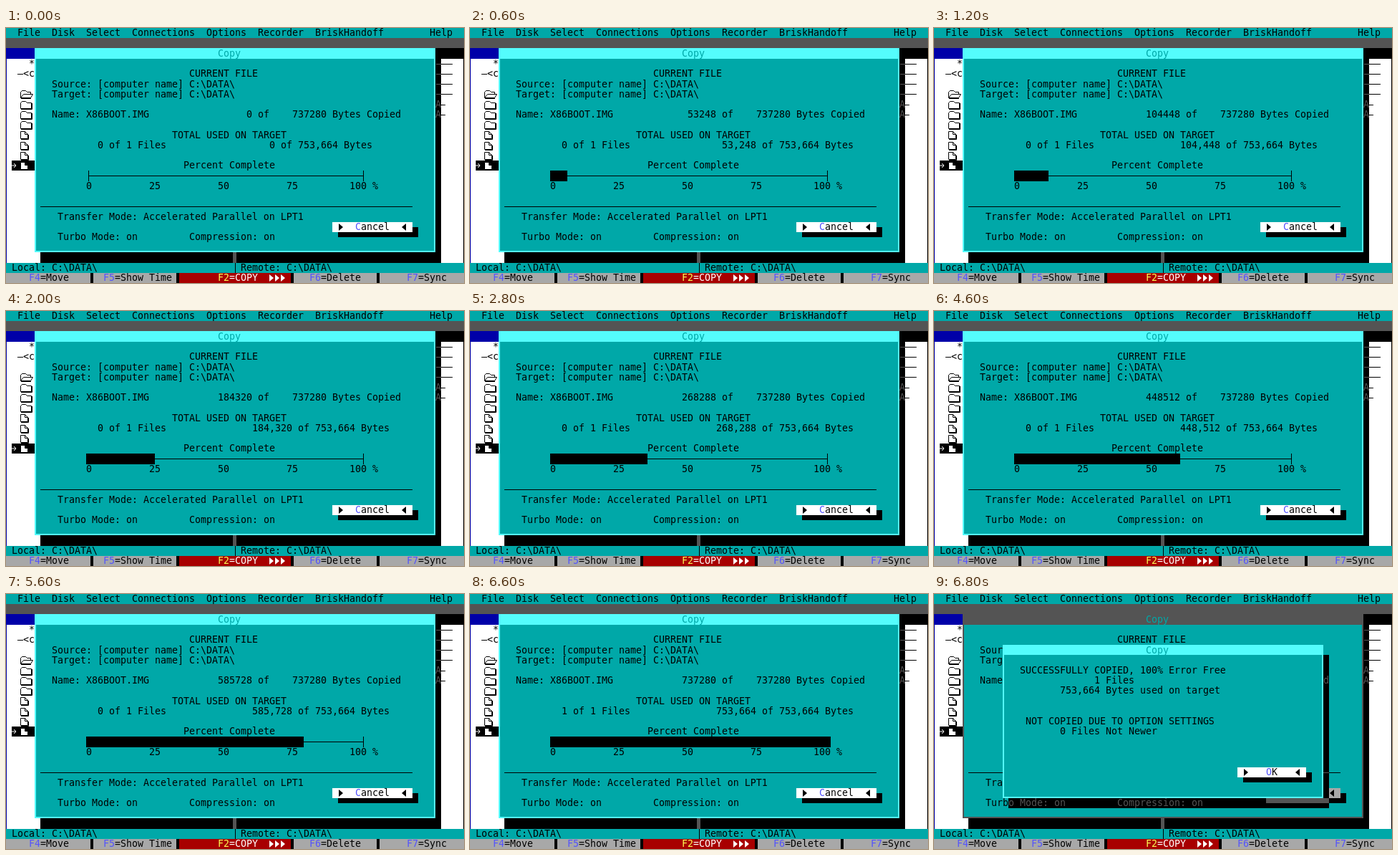
An HTML page that plays this animation: 640 by 356 pixels, repeating every 7000 ms.

```html
<!DOCTYPE html>
<html lang="en">
<head>
<meta charset="utf-8">
<title>Copy</title>
<style>
html, body { margin: 0; width: 100%; height: 100%; overflow: hidden; background: #000; }
svg { display: block; width: 640px; height: 356px; }
text { font: 13.29px "DejaVu Sans Mono", monospace; white-space: pre; }
rect, line { shape-rendering: crispEdges; }
</style>
</head>
<body>
<svg id="screen" viewBox="0 0 640 356"></svg>
<script>
(() => {
const LOOP = 7000, STEP = 200, CELL = 8, ROW = 14.24;
const INK = '#000', WHITE = '#fff', TEAL = '#00a8a8', CYAN = '#54fcfc', DARK = '#545454',
      GRAY = '#a8a8a8', NAVY = '#0000a8', HOT = '#5454fc', RED = '#a80000', YELLOW = '#fcfc54';

const rowTop = row => Math.round(row * ROW);
const rowMid = row => Math.round(row * ROW + 7);

const box = (x1, y1, x2, y2, fill, extra = '') =>
  `<rect x="${x1}" y="${y1}" width="${x2 - x1}" height="${y2 - y1}" fill="${fill}" ${extra}/>`;
const cells = (x1, r1, x2, r2, fill, extra) => box(x1, rowTop(r1), x2, rowTop(r2), fill, extra);
const text = (x, row, str, fill = INK, extra = '') =>
  `<text x="${x}" y="${Math.round(row * ROW + 11.3)}" fill="${fill}" ${extra}>${str.replace(/</g, '&lt;')}</text>`;
const rule = (x1, x2, y, fill = INK) => box(x1, y, x2, y + 1, fill);

// Solid triangle in one cell; dir is 1 for right, -1 for left.
function arrow(x, row, dir, fill = INK) {
  const a = dir > 0 ? x + 1 : x + 7, y = rowMid(row);
  return `<path d="M${a} ${y - 5}L${a + 6 * dir} ${y}L${a} ${y + 5}Z" fill="${fill}"/>`;
}

function button(x1, x2, row, label, labelX) {
  const y = rowTop(row);
  return box(x1 + 8, y + 7, x2 + 8, y + 21, INK) + box(x1, y, x2, y + 14, WHITE) +
    arrow(x1 + 8, row, 1) + arrow(x2 - 16, row, -1) +
    text(labelX, row, label[0], HOT) + text(labelX + CELL, row, label.slice(1));
}

function frame(x1, r1, x2, r2, fill, id = '') {
  const y1 = rowTop(r1), y2 = rowTop(r2);
  return `<g ${id && `id="${id}"`} fill="${fill}">` +
    [[x1, y1, x2, rowTop(r1 + 1)], [x1, y1, x1 + 2, y2], [x2 - 2, y1, x2, y2], [x1, y2 - 2, x2, y2]]
      .map(b => box(...b, 'inherit')).join('') + '</g>';
}

const icons = {
  folder: 'M.5 10.5V2.5L2.5.5H7.5L9.5 2.5H15.5V10.5Z',
  open: 'M.5 10.5V2.5L2.5.5H7.5L9.5 2.5H14.5V5.5M.5 10.5L4.5 5.5H17.5L14.5 10.5Z',
  page: 'M.5 .5H6.5L10.5 4.5V10.5H.5ZM6.5.5V4.5H10.5'
};
const iconShade = { folder: 'M1 11.5H16.5V3', open: 'M1 11.5H15', page: 'M1 11.5H11.5V5' };
const icon = (kind, row) =>
  `<g transform="translate(20 ${rowTop(row) + 2})" stroke="${INK}">` +
  `<path d="${icons[kind]}" fill="${WHITE}"/><path d="${iconShade[kind]}" fill="none"/></g>`;

function desktop() {
  let s = cells(0, 0, 640, 1, TEAL) + cells(0, 1, 640, 2, DARK) +
    cells(0, 2, 600, 3, NAVY) + cells(600, 2, 640, 3, INK) +
    cells(0, 3, 640, 23, WHITE) + cells(0, 3, 1, 23, NAVY) + cells(639, 3, 640, 23, INK);
  const menu = [[16, 'File'], [64, 'Disk'], [112, 'Select'], [176, 'Connections'], [280, 'Options'],
    [352, 'Recorder'], [432, 'BriskHandoff'], [592, 'Help']];
  for (const [x, label] of menu) s += text(x, 0, label);

  s += text(32, 3, '*') + rule(16, 24, rowMid(4)) + text(24, 4, '<c');
  const y = rowMid(13);
  s += cells(8, 13, 40, 14, INK) +
    `<path d="M8 ${y}H14M11 ${y - 3}L14 ${y}L11 ${y + 3}" stroke="${WHITE}" fill="none"/>`;
  s += icon('open', 6);
  for (let r = 7; r < 14; r++) s += icon(r < 10 ? 'folder' : 'page', r);

  s += cells(600, 3, 608, 23, INK) + cells(48, 22, 608, 23, INK) + cells(317, 22, 322, 23, DARK);
  for (let r = 3; r < 7; r++) s += rule(601, 608, rowMid(r), DARK) + rule(608, 624, rowMid(r));
  for (const r of [7, 8]) s += text(600, r, 'A', DARK) + rule(608, 614, rowMid(r));
  return s;
}

function statusBars() {
  let s = cells(0, 23, 640, 24, TEAL) + text(8, 23, 'Local: C:\\DATA\\') +
    cells(320, 23, 321, 24, INK) + text(328, 23, 'Remote: C:\\DATA\\');
  s += cells(0, 24, 640, 25, GRAY) + cells(242, 24, 398, 25, RED);
  for (const x of [118, 238, 398, 518]) s += cells(x, 24, x + 4, 25, INK);
  const keys = [[32, 'F4', '=Move'], [136, 'F5', '=Show Time'], [424, 'F6', '=Delete'], [560, 'F7', '=Sync']];
  for (const [x, key, label] of keys) s += text(x, 24, key, HOT) + text(x + 16, 24, label);
  s += text(296, 24, 'F2', YELLOW, 'font-weight="bold"') + text(312, 24, '=COPY', WHITE, 'font-weight="bold"');
  for (let i = 0; i < 3; i++) s += arrow(367 + i * CELL, 24, 1, WHITE);
  return s;
}

function copyDialog() {
  let s = cells(40, 2, 600, 22, TEAL) + frame(40, 2, 600, 22, CYAN, 'rim') + text(296, 2, 'Copy', TEAL);
  const lines = [
    [256, 4, 'CURRENT FILE'],
    [64, 5, 'Source: [computer name] C:\\DATA\\'],
    [64, 6, 'Target: [computer name] C:\\DATA\\'],
    [64, 8, 'Name: X86BOOT.IMG'],
    [352, 8, 'of'], [400, 8, '737280 Bytes Copied'],
    [232, 10, 'TOTAL USED ON TARGET'],
    [248, 13, 'Percent Complete'],
    [112, 15, '0'], [200, 15, '25'], [296, 15, '50'], [392, 15, '75'], [480, 15, '100 %'],
    [72, 18, 'Transfer Mode: Accelerated Parallel on LPT1'],
    [72, 20, 'Turbo Mode: on'], [256, 20, 'Compression: on']
  ];
  for (const l of lines) s += text(...l);
  s += text(0, 8, '', INK, 'id="bytes"') + text(128, 11, '', INK, 'id="files"') + text(0, 11, '', INK, 'id="total"');
  s += rule(116, 500, rowMid(14)) + cells(115, 14, 116, 15, INK) + cells(499, 14, 500, 15, INK) +
    cells(112, 14, 112, 15, INK, 'id="bar"');
  return s + rule(48, 568, rowMid(17)) + button(456, 568, 19, 'Cancel', 488);
}

function resultDialog() {
  // The dialog's shadow dims whatever it covers.
  let s = cells(552, 19, 568, 20, GRAY) + arrow(552, 19, -1) +
    cells(544, 6, 552, 21, INK) + cells(104, 20, 552, 21, INK) +
    text(544, 8, 'd', DARK) + rule(544, 552, rowMid(17), DARK) +
    text(104, 20, 'o Mode: on', DARK) + text(256, 20, 'Compression: on', DARK) +
    box(464, rowTop(20), 552, rowTop(20) + 7, DARK);
  s += cells(96, 5, 544, 20, TEAL) + frame(96, 5, 544, 20, CYAN) + text(296, 5, 'Copy', TEAL);
  const lines = [
    [120, 7, 'SUCCESSFULLY COPIED, 100% Error Free'],
    [224, 8, '1 Files'],
    [176, 9, '753,664 Bytes used on target'],
    [128, 12, 'NOT COPIED DUE TO OPTION SETTINGS'],
    [176, 13, '0 Files Not Newer']
  ];
  for (const l of lines) s += text(...l);
  return `<g id="result">${s}${button(424, 520, 17, 'OK', 464)}</g>`;
}

document.getElementById('screen').innerHTML = desktop() + statusBars() + copyDialog() + resultDialog();
const [bytes, files, total, bar, rim, result] =
  ['bytes', 'files', 'total', 'bar', 'rim', 'result'].map(id => document.getElementById(id));

// Copied kilobytes by step, linear in between.
const progress = [[0, 0], [6, 102], [12, 218], [14, 262], [18, 342], [23, 438], [28, 572], [33, 720], [34, 720]];
const SIZE = 720;

function copiedAt(step) {
  const i = Math.max(1, progress.findIndex(p => p[0] >= step));
  const [s0, k0] = progress[i - 1], [s1, k1] = progress[i];
  return 2 * Math.round((k0 + (k1 - k0) * (step - s0) / (s1 - s0)) / 2);
}

function put(el, x, str) {
  el.setAttribute('x', x);
  el.textContent = str;
}

let shown = -1;
function show(step) {
  if (step === shown) return;
  shown = step;
  const kb = copiedAt(step), full = kb === SIZE, done = step === 34;
  const count = String(kb * 1024);
  put(bytes, 344 - count.length * CELL, count);
  files.textContent = `${full ? 1 : 0} of 1 Files`;
  const used = full ? '753,664' : (kb * 1024).toLocaleString('en-US');
  const sum = `${used} of 753,664 Bytes`;
  put(total, (55 - (sum.length >> 1)) * CELL, sum);
  bar.setAttribute('width', Math.floor(49 * kb / SIZE) * CELL);
  rim.setAttribute('fill', done ? DARK : CYAN);
  result.style.display = done ? '' : 'none';
}

const start = performance.now();
function tick() {
  show(Math.floor((performance.now() - start) % LOOP / STEP));
  requestAnimationFrame(tick);
}
tick();
})();
</script>
</body>
</html>
```
